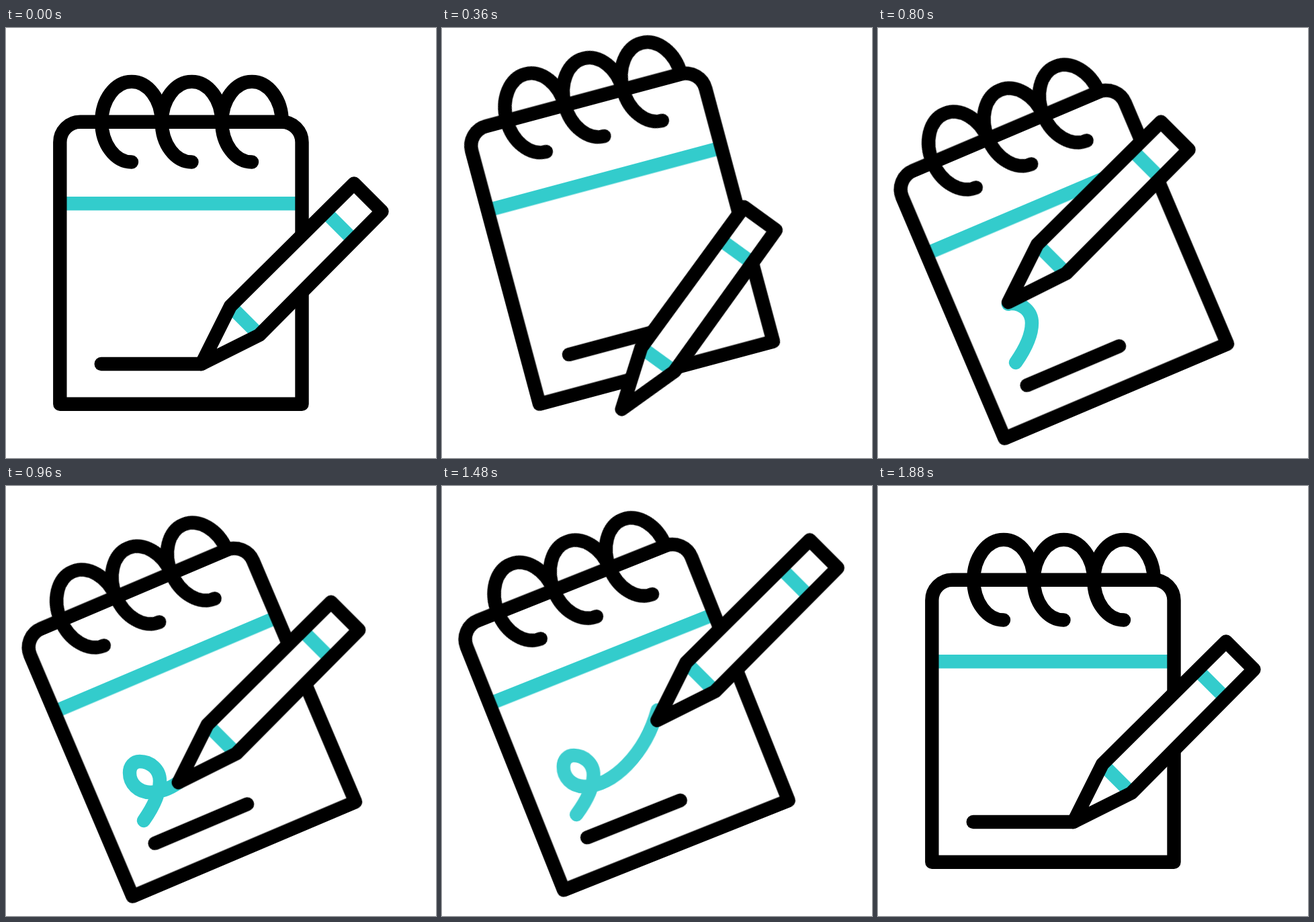
An HTML page without scripts that plays this animation: 640x640 px, repeating every 2000 ms.

```html
<!DOCTYPE html>
<html lang="en">
<head>
<meta charset="utf-8">
<title>Notepad and pencil</title>
<style>
  html, body { margin: 0; width: 100%; height: 100%; overflow: hidden; background: #fff; }
  svg { display: block; width: 100%; height: 100%; }

  svg {
    fill: none;
    stroke: #000;
    stroke-width: 20.4;
    stroke-linecap: round;
    stroke-linejoin: round;
  }
  .teal { stroke: #3cc; }
  .band { stroke: #3cc; stroke-linecap: butt; }

  .hop, .turn, .ink, .pencil, .tilt {
    animation: 2s cubic-bezier(.333, 0, .667, 1) infinite;
  }
  .hop { animation-name: hop; }
  .turn { animation-name: turn; transform-origin: 260.3px 350px; }
  .ink { animation-name: write, show; stroke-dasharray: 1 2; }
  .pencil {
    animation-name: follow, carry;
    offset-path: path("M205 498C219 478 229 458 229 439C229 421 213 407.5 198 407.5C189 407.5 184 417 184 427C184 443 197 456 215 456C258 456 306 404 322 340");
    offset-rotate: 0deg;
  }
  .tilt { animation-name: tilt; transform-origin: 124px -124px; }

  /* notepad: jump and turn left, later jump back */
  @keyframes hop {
    0%, 6% { transform: translate(0, 0); }
    16% { transform: translate(3.5px, -44px); }
    26% { transform: translate(11.9px, -2.6px); }
    72% { transform: translate(11.9px, -2.6px); animation-timing-function: cubic-bezier(.3, .2, .67, 1); }
    83% { transform: translate(3.5px, -44px); }
    94%, 100% { transform: translate(0, 0); }
  }
  @keyframes turn {
    0%, 6% { transform: rotate(0deg); }
    26% { transform: rotate(-23deg); }
    72% { transform: rotate(-23deg); animation-timing-function: cubic-bezier(.33, .13, .67, 1); }
    94%, 100% { transform: rotate(0deg); }
  }

  /* signature */
  @keyframes write {
    0%, 26% { stroke-dashoffset: 1; }
    62.5%, 100% { stroke-dashoffset: 0; }
  }
  @keyframes show {
    0%, 25.99% { opacity: 0; }
    26% { opacity: 1; }
    72% { opacity: 1; animation-timing-function: cubic-bezier(.33, .08, .67, 1); }
    94%, 100% { opacity: 0; }
  }

  /* pencil: offset follows the signature, transform carries it to and from the line */
  @keyframes follow {
    0%, 26% { offset-distance: 0%; }
    62.5%, 100% { offset-distance: 100%; }
  }
  @keyframes carry {
    0%, 6% { transform: translate(86px, 2px); }
    16% { transform: translate(46.6px, 57.6px); }
    26% { transform: translate(0, 0); }
    72% { transform: translate(0, 0); animation-timing-function: cubic-bezier(.33, .13, .67, 1); }
    94%, 100% { transform: translate(-31px, 160px); }
  }
  @keyframes tilt {
    0%, 6% { transform: rotate(0deg); }
    16% { transform: rotate(-10.2deg); }
    26%, 100% { transform: rotate(0deg); }
  }
</style>
</head>
<body>
<svg viewBox="0 0 640 640">
  <defs>
    <path id="ring" d="M231.7 139.7A44.7 59.8 0 1 0 187 199.5"/>
  </defs>

  <g class="hop">
    <g class="turn">
      <path class="band" d="M80.3 261.3H440.5"/>
      <path d="M80.3 559.8V170A30 30.3 0 0 1 110.3 139.7H410.5A30 30.3 0 0 1 440.5 170V559.8Z"/>
      <use href="#ring"/>
      <use href="#ring" x="89.5"/>
      <use href="#ring" x="179"/>
      <path d="M141.7 500H291"/>
      <!-- signature is laid out for the turned pad -->
      <g transform="rotate(23 260.3 350) translate(-11.9 2.6)">
        <path class="teal ink" pathLength="1" d="M205 498C219 478 229 458 229 439C229 421 214 410 199 410C190 410 184 417 184 427C184 443 197 456 215 456C258 456 306 404 322 340"/>
      </g>
    </g>
  </g>

  <!-- pencil tip sits at the origin -->
  <g class="pencil">
    <g class="tilt">
      <path fill="#fff" stroke="none" d="M0 0L43 -86L227 -268.5L268.5 -227L86 -43Z"/>
      <path class="band" d="M43 -86L86 -43M184 -226.5L226.5 -184"/>
      <path d="M0 0L43 -86L227 -268.5L268.5 -227L86 -43Z"/>
    </g>
  </g>
</svg>
</body>
</html>
```
